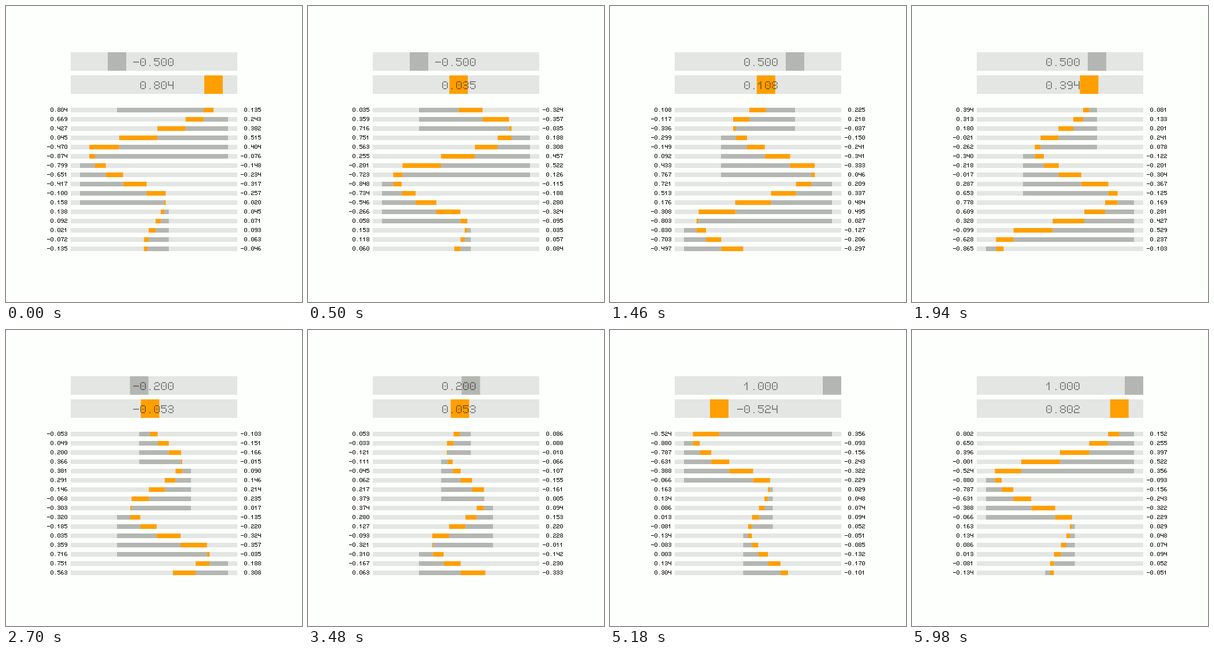
A matplotlib script that plays this animation: 512x512 px, repeating every 6000 ms.

```python
import numpy as np
import matplotlib.pyplot as plt
from matplotlib.animation import FuncAnimation
from matplotlib.patches import PathPatch, Rectangle
from matplotlib.path import Path

SIZE, FRAMES, DT = 512, 300, 0.02
ROWS, LAG, HOLD = 16, 10, 50
MID, SCALE, LEFT, WIDTH = 256, 128, 112, 288
BACK, TRACK, GREY, ORANGE = "#fdfffc", "#e4e6e3", "#b4b6b2", "#ff9f00"
GOALS = (-0.5, 0.5, -0.2, 0.2, -1.0, 1.0)
STIFF = 15.0
DAMP = 2 * STIFF ** 0.5

# Glyph strokes on a 5x7 grid, each point written as column and row
STROKES = {
    "0": "10 30 41 45 36 16 05 01 10|23 23",
    "1": "02 20 26",
    "2": "01 10 30 41 42 33 13 04 06 46",
    "3": "01 10 30 41 42 33 13|33 44 45 36 16 05",
    "4": "00 03 43|40 46",
    "5": "40 00 02 32 43 45 36 16 05",
    "6": "30 10 01 05 16 36 45 44 33 03",
    "7": "00 40 41 23 26",
    "8": "13 02 01 10 30 41 42 33 13 04 05 16 36 45 44 33",
    "9": "16 36 45 41 30 10 01 02 13 43",
    ".": "26 26",
    "-": "03 43",
}


def glyph_cells(strokes):
    cells = set()
    for stroke in strokes.split("|"):
        pts = [(int(p[0]), int(p[1])) for p in stroke.split()]
        for (x0, y0), (x1, y1) in zip(pts, pts[1:]):
            n = max(abs(x1 - x0), abs(y1 - y0), 1)
            for i in range(n + 1):
                cells.add((x0 + (x1 - x0) * i // n, y0 + (y1 - y0) * i // n))
    return np.array(sorted(cells), float)


GLYPHS = {ch: glyph_cells(s) for ch, s in STROKES.items()}
SQUARE = np.array([(0, 0), (1, 0), (1, 1), (0, 1), (0, 0)], float)
CODES = [Path.MOVETO, Path.LINETO, Path.LINETO, Path.LINETO, Path.CLOSEPOLY]


def text_path(labels):
    """Join (value, x, y, pixel size) labels into one path."""
    blocks = []
    for value, x, y, px in labels:
        for i, ch in enumerate(f"{value:6.3f}"):
            if ch != " ":
                cells = GLYPHS[ch] + (6 * i, 0)
                quads = (cells[:, None] + SQUARE) * px + (x, y)
                blocks.append(quads.reshape(-1, 2))
    verts = np.concatenate(blocks)
    return Path(verts, CODES * (len(verts) // 5))


def simulate():
    """Damped spring chasing the goal, run until it is periodic."""
    goal = np.repeat(GOALS, HOLD)
    pos = np.zeros(FRAMES)
    x = v = 0.0
    for n in range(4 * FRAMES):
        v += (STIFF * (goal[n % FRAMES] - x) - DAMP * v) * DT
        x += v * DT
        pos[n % FRAMES] = x
    return goal, pos


goal, pos = simulate()

fig = plt.figure(figsize=(SIZE / 100, SIZE / 100), dpi=100, facecolor=BACK)
ax = fig.add_axes([0, 0, 1, 1])
ax.set_xlim(0, SIZE)
ax.set_ylim(SIZE, 0)
ax.axis("off")


def rect(x, y, w, h, color, z):
    return ax.add_patch(Rectangle((x, y), w, h, fc=color, lw=0, snap=False, zorder=z))


def label_patch(**style):
    return ax.add_patch(PathPatch(Path([(0, 0)]), fc="black", lw=0, snap=False,
                                  zorder=4, **style))


def to_x(value):
    return MID + SCALE * value


def span(bar, a, b):
    bar.set_x(to_x(min(a, b)))
    bar.set_width(SCALE * abs(a - b))


row_y = [176 + 16 * k for k in range(ROWS)]
for y in (80, 120):
    rect(LEFT, y, WIDTH, 32, TRACK, 1)
for y in row_y:
    rect(LEFT, y, WIDTH, 8, TRACK, 1)
goal_box = rect(0, 80, 32, 32, GREY, 2)
pos_box = rect(0, 120, 32, 32, ORANGE, 2)
goal_bars = [rect(0, y, 0, 8, GREY, 2) for y in row_y]
step_bars = [rect(0, y, 0, 8, ORANGE, 3) for y in row_y]
big_text = label_patch(alpha=0.4)
small_text = label_patch()


def draw(n):
    goal_box.set_x(to_x(goal[n]) - 16)
    pos_box.set_x(to_x(pos[n]) - 16)
    big_text.set_path(text_path([(goal[n], 220, 90, 2), (pos[n], 220, 130, 2)]))

    labels = []
    for k, y in enumerate(row_y):
        i = (n - LAG * k) % FRAMES
        now, before = pos[i], pos[i - LAG]
        span(goal_bars[k], goal[i], now)
        span(step_bars[k], before, now)
        labels += [(now, 71, y, 1), (now - before, 406, y, 1)]
    small_text.set_path(text_path(labels))
    return goal_box, pos_box, *goal_bars, *step_bars, big_text, small_text


anim = FuncAnimation(fig, draw, frames=FRAMES, interval=1000 * DT, repeat=True)
plt.show()
```
